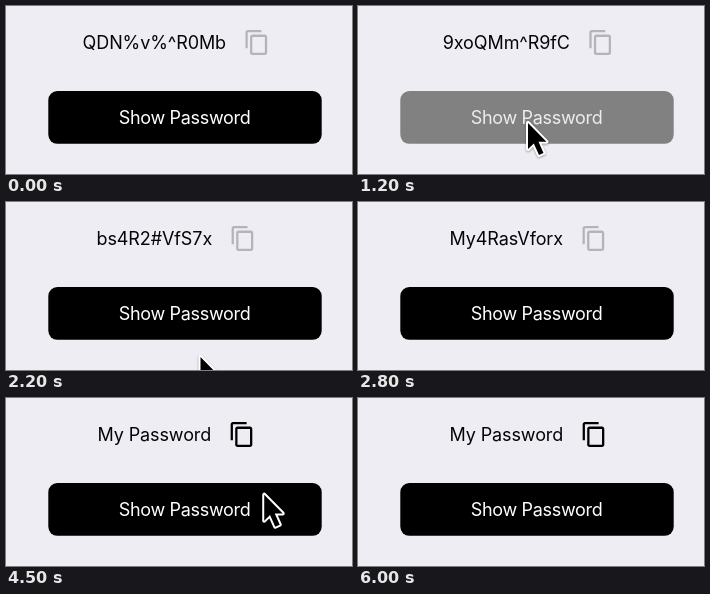
Write an HTML page that moves like this. It is 346x168 px and loops after 6700 ms.

```html
<!DOCTYPE html>
<html lang="en">
<head>
<meta charset="utf-8">
<title>Show password</title>
<style>
  html, body { margin: 0; width: 100%; height: 100%; overflow: hidden; background: #eeedf4; }
  svg { display: block; width: 346px; height: 168px; }
  text { font: 400 18px Inter, Roboto, sans-serif; white-space: pre; }
  #secret { letter-spacing: -.1px; fill: #050506; }
  #label { letter-spacing: -.3px; fill: #fff; text-anchor: middle; }
  #cursor { filter: drop-shadow(0 1.5px 1.2px rgba(0, 0, 0, .35)); }
</style>
</head>
<body>
<svg viewBox="0 0 346 168">
  <text id="secret" y="43.3"></text>
  <g id="icon">
    <path transform="scale(1.14)" d="M16 1H4c-1.1 0-2 .9-2 2v14h2V3h12V1zm3 4H8c-1.1 0-2 .9-2 2v14c0 1.1.9 2 2 2h11c1.1 0 2-.9 2-2V7c0-1.1-.9-2-2-2zm0 16H8V7h11v14z"/>
  </g>
  <rect id="button" x="42.3" y="85" width="273.4" height="52.8" rx="9"/>
  <text id="label" x="178.6" y="118">Show Password</text>
  <path id="cursor" d="M0 0V26L5.8 20.4 11 32 15.5 30 10.5 18.8H18.5Z"
    stroke="#fff" stroke-width="4" stroke-linejoin="round" paint-order="stroke"/>
</svg>
<script>
// Times are counted in steps of 100 ms.
const LOOP = 6700, STEP = 100;
const ROW_CENTER = 170.6, GAP = 17.2, ICON = 27.4;
const REVEALED = 36;

const texts = [
  { at: 0, text: 'QDN%v%^R0Mb' },
  { at: 5, text: 'AYo%3C^R0o3' },
  { at: 12, text: '9xoQMm^R9fC' },
  { at: 22, text: 'bs4R2#VfS7x' },
  { at: 32, text: 'My Passrord' },
  { at: REVEALED, text: 'My Password' }
];

// The pointer glides in from below, rests on its goal and speeds away.
const buttonVisit = {
  enter: 2, arrive: 9, leave: 21, gone: 23,
  from: [175, 180], goal: [170, 117], exit: [268, 269]
};
const iconVisit = {
  enter: 42, arrive: 50, leave: 56, gone: 60,
  from: [289, 199], goal: [238.5, 31], exit: [261, 175]
};

const [secret, icon, button, label, cursor] =
  ['secret', 'icon', 'button', 'label', 'cursor'].map(id => document.getElementById(id));

const clamp = x => Math.min(1, Math.max(0, x));
const progress = (step, start, end) => clamp((step - start) / (end - start));
const mix = (a, b, p) => a.map((v, i) => v + (b[i] - v) * p);

// Rises over two steps, holds, and falls over two steps.
const press = (step, start, end) => clamp(Math.min(step - start, end - step) / 2);

function cursorAt(step) {
  const visit = step < iconVisit.enter ? buttonVisit : iconVisit;
  const remaining = 1 - progress(step, visit.enter, visit.arrive);
  const away = progress(step, visit.leave, visit.gone);
  return away > 0
    ? mix(visit.goal, visit.exit, away ** 2)
    : mix(visit.goal, visit.from, remaining ** 2);
}

// Swap differing characters one by one in a scattered order.
function textAt(step) {
  const i = texts.findLastIndex(key => key.at <= step);
  const from = texts[i], to = texts[i + 1];
  if (!to) return from.text;
  const chars = [...from.text];
  const order = chars.map((_, n) => (n * 7 + i * 3) % chars.length)
    .filter(n => from.text[n] !== to.text[n]);
  const done = Math.floor(order.length * progress(step, from.at, to.at));
  order.slice(0, done).forEach(n => { chars[n] = to.text[n]; });
  return chars.join('');
}

function drawRow(step) {
  secret.textContent = textAt(step);
  const width = secret.getComputedTextLength();
  const left = ROW_CENTER - (width + GAP + ICON) / 2;
  secret.setAttribute('x', left);
  icon.setAttribute('transform', `translate(${left + width + GAP} 22.9)`);
  icon.setAttribute('opacity', step < REVEALED ? .24 : 1 - .55 * press(step, 49, 54));
}

function draw(step) {
  drawRow(step);
  const pressed = press(step, 9, 16);
  const gray = 129 * pressed;
  button.setAttribute('fill', `rgb(${gray}, ${gray}, ${gray})`);
  label.setAttribute('opacity', 1 - .15 * pressed);
  cursor.setAttribute('transform', `translate(${cursorAt(step)})`);
}

const began = performance.now();
function tick() {
  const time = Math.max(0, performance.now() - began) % LOOP;
  draw(Math.floor(time / STEP));
  requestAnimationFrame(tick);
}
tick();
</script>
</body>
</html>
```
